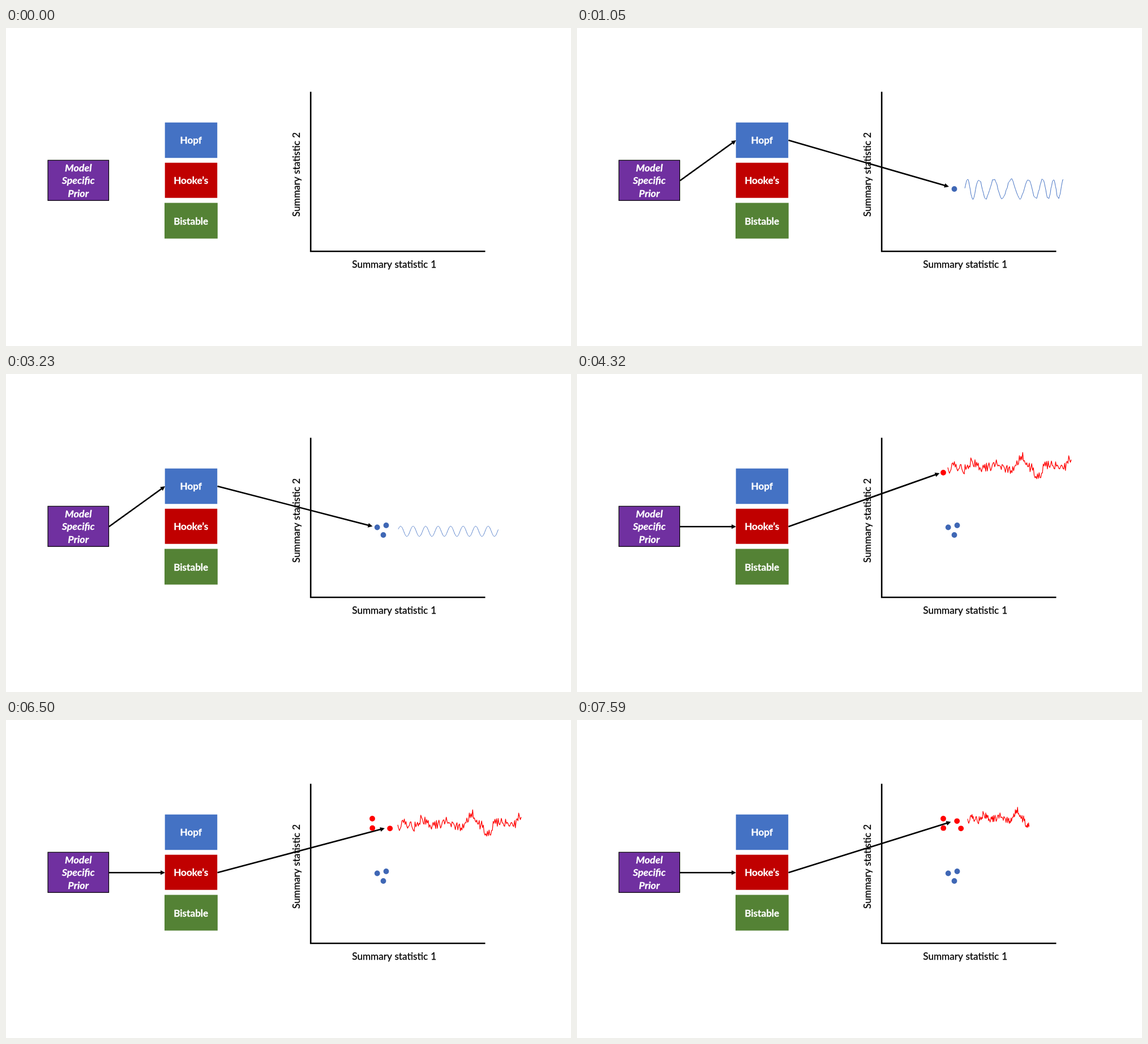
Recreate the animation shown at these times as an HTML page. Size 998 by 561 pixels, loop 8000 ms.

```html
<!DOCTYPE html>
<html lang="en">
<head>
<meta charset="utf-8">
<title>Model sampling</title>
<style>
  html, body { margin: 0; width: 100%; height: 100%; overflow: hidden; background: #fff; }
  svg { display: block; width: 100%; height: 100%; }
  text { font-family: Lato, sans-serif; text-anchor: middle; stroke-width: .3px; }
  .label { font-size: 17.2px; word-spacing: .5px; stroke: #000; }
  .name { font-size: 17.1px; font-weight: bold; fill: #fff; stroke: #fff; }
  .prior { font-size: 17.9px; font-style: italic; }
</style>
</head>
<body>
<svg viewBox="0 0 998 561">
  <rect x="74" y="233.3" width="107.5" height="71" fill="#7030a0" stroke="#000" stroke-width="1.2"/>
  <text class="name prior" x="127.7" y="253">Model</text>
  <text class="name prior" x="127.7" y="275.4">Specific</text>
  <text class="name prior" x="127.7" y="297.8">Prior</text>
  <rect x="280.7" y="166.7" width="92.5" height="62.5" fill="#4472c4"/>
  <rect x="280.7" y="237.7" width="92.5" height="62" fill="#c00000"/>
  <rect x="280" y="308.5" width="93.8" height="63" fill="#548235"/>
  <text class="name" x="326.7" y="204.3">Hopf</text>
  <text class="name" x="326.7" y="275.3">Hooke’s</text>
  <text class="name" x="326.7" y="346.5">Bistable</text>
  <path d="M538.2 112.5V394H846.5" fill="none" stroke="#000" stroke-width="2.6"/>
  <text class="label" x="685.7" y="423">Summary statistic 1</text>
  <text class="label" transform="translate(518.5 258.5) rotate(-90)">Summary statistic 2</text>
  <g id="scene"></g>
</svg>
<script>
const LOOP = 8000, FIRST = 1050, STEP = 1090, TAU = 2 * Math.PI;
const BLUE = '#4472c4', DOT_BLUE = '#3f67b5', RED = '#ff0000';
const scene = document.getElementById('scene');

// Seeded noise in -1..1.
const noise = n => { const s = Math.sin(n * 127.1 + 3.7) * 43758.5453; return (s - Math.floor(s)) * 2 - 1; };
const sample = (count, fn) => Array.from({ length: count + 1 }, (_, i) => fn(i / count, i));

// Every curve is a list of points measured from its own start.
const sine = sample(350, u => {
  const x = u * 176.5;
  return [x, -9 * Math.cos((x - 4) * TAU / 22.1)];
});

// Rough cycles whose period stretches in the middle.
const cycles = sample(110, (u, i) => {
  const k = -0.25 + 7.25 * u, a = k * TAU / 7;
  const x = 4 + 21.3 * k + 3.5 * (1 - Math.cos(a)) - 6 * Math.sin(a);
  return [x, -17 * Math.cos(TAU * k) + 1.8 * noise(i)];
});

// Random walk: a slow course through a few heights, with fast jitter on top.
const course = [0, -9, -3, -16, -4, -6, -16, -2, -2, -25, -6, 9, -12, -9, -5, -23];
const walk = sample(150, (u, i) => {
  const p = u * (course.length - 1), j = Math.min(Math.floor(p), course.length - 2);
  const ease = (1 - Math.cos(Math.PI * (p - j))) / 2;
  return [u * 218, course[j] + (course[j + 1] - course[j]) * ease + 8.5 * noise(i)];
});

function trace(points, color, width, x, y, sx = 1, sy = 1) {
  const d = points.map(p => (x + p[0] * sx).toFixed(1) + ' ' + (y + p[1] * sy).toFixed(1)).join('L');
  return `<path d="M${d}" fill="none" stroke="${color}" stroke-width="${width}" stroke-linejoin="round"/>`;
}

function arrow(x0, y0, x1, y1) {
  const angle = Math.atan2(y1 - y0, x1 - x0) * 360 / TAU, len = Math.hypot(x1 - x0, y1 - y0);
  return `<g transform="translate(${x0} ${y0}) rotate(${angle})">
    <path d="M0 0H${len - 6}" stroke="#000" stroke-width="2.6"/>
    <path d="M${len} 0l-8 -4v8z"/></g>`;
}

const dot = ([x, y], color) => `<circle cx="${x}" cy="${y}" r="4.9" fill="${color}"/>`;

const hopf = (at, tip, line) => ({ y: 198, color: DOT_BLUE, at, tip, line });
const hooke = (at, tip, line) => ({ y: 269.2, color: RED, at, tip, line });
const samples = [
  hopf([666.5, 284], [657, 280], trace(cycles, BLUE, 1, 685, 284, 1.137)),
  hopf([671.5, 267], [662, 262.5], trace(cycles, BLUE, 1, 690, 267)),
  hopf([655.7, 270.5], [647.5, 268.8], trace(sine, BLUE, 0.9, 693, 277.5)),
  hooke([647, 174], [640.5, 175], trace(walk, RED, 1.25, 655, 171)),
  hooke([647.2, 190.7], [642, 191.5], trace(walk, RED, 0.9, 661, 191, 0.532)),
  hooke([678.2, 191.3], [669, 191], trace(walk, RED, 1.25, 692, 191)),
  hooke([671.2, 178.3], [660.5, 179.8], trace(walk.filter(p => p[0] <= 163), RED, 1.2, 690, 179, 0.667, 0.77))
];

function draw(count) {
  if (!count) return '';
  const { y, tip, line } = samples[count - 1];
  return arrow(182, 269.2, 281, y) + arrow(373.5, y, ...tip) + line +
    samples.slice(0, count).map(s => dot(s.at, s.color)).join('');
}

let shown = -1;
function update(now) {
  const t = now % LOOP;
  const count = t < FIRST ? 0 : Math.min(samples.length, 1 + Math.floor((t - FIRST) / STEP));
  if (count !== shown) scene.innerHTML = draw(shown = count);
}

const start = performance.now();
function tick() {
  update(performance.now() - start);
  requestAnimationFrame(tick);
}
tick();
</script>
</body>
</html>
```
